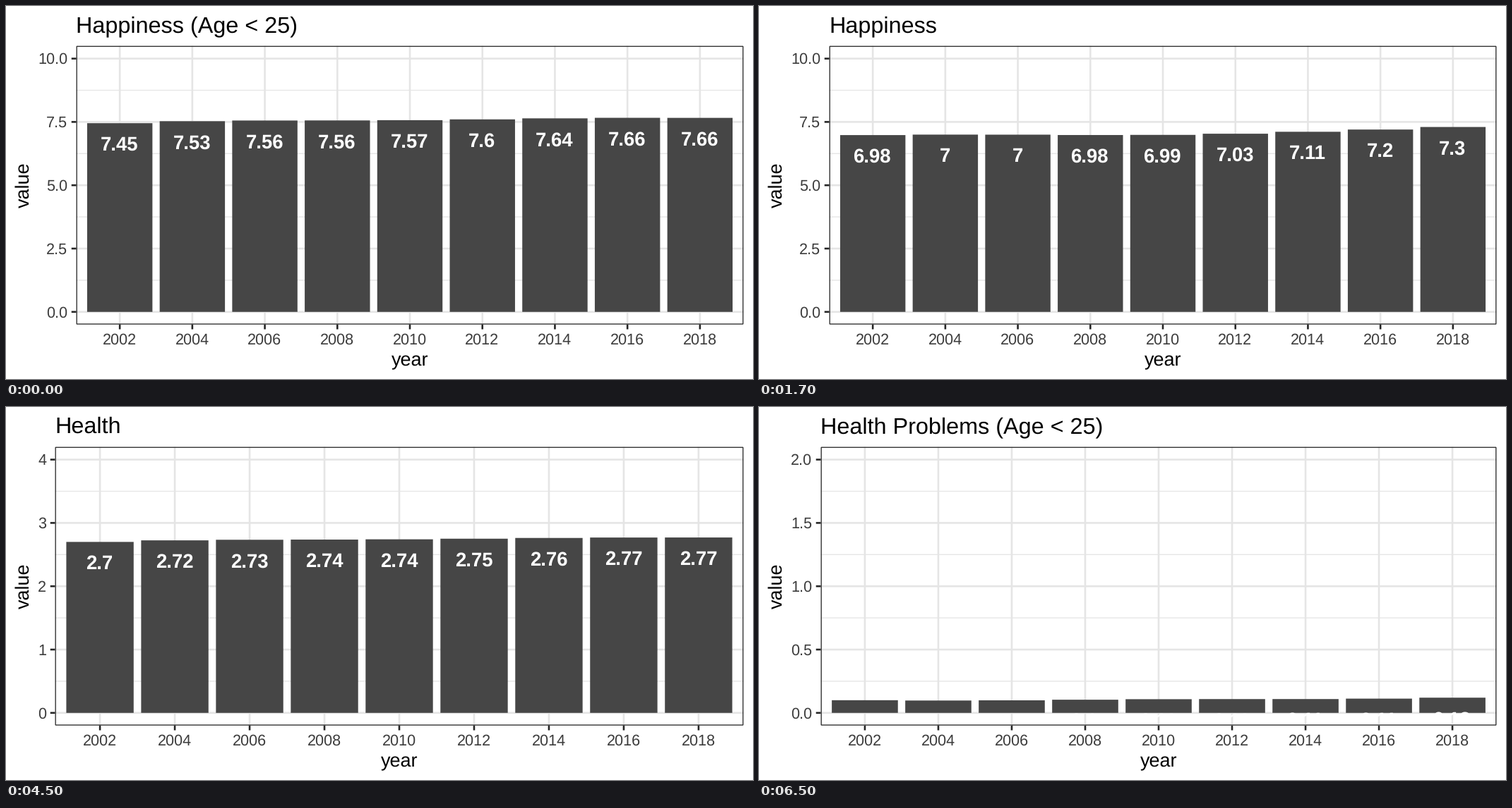
Write a matplotlib script that moves like this. It is 1058 px wide and 529 px high and loops after 8 s.

```python
import numpy as np
import matplotlib.pyplot as plt
from matplotlib.animation import FuncAnimation
from matplotlib.patches import Rectangle

W, H, DPI = 1058, 529, 64
PT = 72 / DPI                       # points per pixel
RIGHT, TOP, BOTTOM = 1044.5, 56.6, 451.7
ZERO, STEP = 433.8, 89.8            # baseline of the bars, gap between major lines
BASE = 27                           # base font size in pixels
TICK_SIZE = 0.8 * BASE
LINE = 2.6
BAR, GRID, DARK, TICK_TEXT = "#464646", "#e5e5e5", "#252525", "#3c3c3c"

YEARS = range(2002, 2020, 2)

plt.rcParams.update({
    "font.family": "Liberation Sans",
    "path.snap": False,
    "text.hinting": "none",
})

fig = plt.figure(figsize=(W / DPI, H / DPI), dpi=DPI, facecolor="white")
ax = fig.add_axes([0, 0, 1, 1])


def trend(start, end, power, wave):
    """Eased rise from start to end with a slow wave on top."""
    u = np.linspace(0, 1, len(YEARS))
    return start + (end - start) * u**power + wave * np.sin(3 * np.pi * u)


# title, axis maximum, values
CHARTS = [
    ("Happiness (Age < 25)", 10, trend(7.45, 7.66, 0.6, 0.02)),
    ("Happiness", 10, trend(6.98, 7.3, 3.5, 0.02)),
    ("Health (Age < 25)", 4, trend(3.21, 3.33, 0.4, -0.015)),
    ("Health", 4, trend(2.7, 2.77, 0.6, 0.005)),
    ("Health Problems (Age < 25)", 2, trend(0.1, 0.12, 2, -0.003)),
]


def line(x0, y0, x1, y1, color, width=LINE):
    ax.plot([x0, x1], [y0, y1], color=color, lw=width * PT,
            solid_capstyle="butt", zorder=1)


def text(x, y, s, size, color="black", ha="center", **kw):
    return ax.text(x, y, s, fontsize=size * PT, color=color, ha=ha,
                   va="baseline", rotation_mode="anchor", **kw)


def box(x0, y0, x1, y1, **kw):
    return ax.add_patch(Rectangle((x0, y0), x1 - x0, y1 - y0, **kw))


def panel_left(label):
    """Left edge of the panel, leaving room for the widest tick label."""
    ems = sum(0.278 if c == "." else 0.556 for c in label)
    return 57.5 + ems * TICK_SIZE


def draw_chart(title, top_value, values):
    ax.clear()
    ax.set(xlim=(0, W), ylim=(H, 0))
    ax.axis("off")

    fmt = ".1f" if top_value % 4 else ".0f"
    left = panel_left(format(top_value, fmt))
    unit = (RIGHT - left) / (len(YEARS) + 0.2)
    scale = 4 * STEP / top_value

    panel = box(left, BOTTOM, RIGHT, TOP, fc="none", lw=0)
    inset = LINE / 4
    box(left + inset, BOTTOM - inset, RIGHT - inset, TOP + inset, fc="none",
        ec=DARK, lw=LINE / 2 * PT, joinstyle="miter", zorder=5)

    for k in range(5):
        y = ZERO - k * STEP
        if k < 4:
            line(left, y - STEP / 2, RIGHT, y - STEP / 2, GRID, LINE / 2)
        line(left, y, RIGHT, y, GRID)
        line(left - 6.8, y, left, y, DARK)
        text(left - 12.4, y + 7.5, format(k * top_value / 4, fmt),
             TICK_SIZE, TICK_TEXT, ha="right")

    for i, (year, value) in enumerate(zip(YEARS, values)):
        x = left + (i + 0.6) * unit
        y = ZERO - value * scale
        line(x, TOP, x, BOTTOM, GRID)
        line(x, BOTTOM, x, BOTTOM + 6.8, DARK)
        text(x - 0.4, 479.4, str(year), TICK_SIZE, TICK_TEXT)
        box(x - 0.45 * unit, y, x + 0.45 * unit, ZERO, fc=BAR, lw=0, zorder=3)
        label = text(x - 0.5, y + 39, f"{round(value, 2):g}", 27.5, "white",
                     weight="bold", zorder=4, clip_on=True)
        label.set_clip_path(panel)

    text(left - 0.5, 37, title, 1.2 * BASE, ha="left")
    text((left + RIGHT) / 2, 510, "year", BASE)
    text(33, (TOP + BOTTOM) / 2, "value", BASE, rotation=90)


def update(frame):
    # each chart holds four ticks; the loop opens on the first one's last tick
    draw_chart(*CHARTS[(frame + 3) // 4])
    return []


anim = FuncAnimation(fig, update, frames=16, interval=500, repeat=True,
                     repeat_delay=0, blit=False)
plt.show()
```
